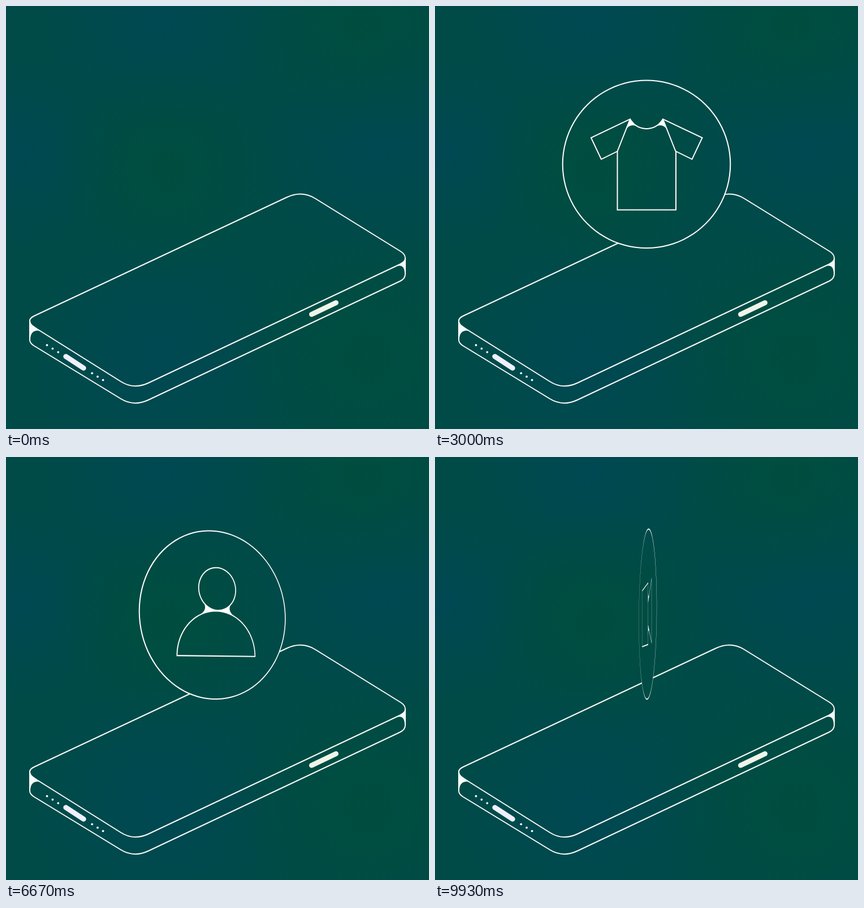
An HTML page with a canvas that plays this animation: 748 by 748 pixels, repeating every 9.99 s.

```html
<!DOCTYPE html>
<html lang="en">
<head>
<meta charset="utf-8">
<title>Phone with turning icons</title>
<style>
  html, body { margin: 0; width: 100%; height: 100%; overflow: hidden; background: #004b48; }
  canvas { display: block; width: 748px; height: 748px; }
</style>
</head>
<body>
<canvas id="stage" width="748" height="748"></canvas>
<script>
const SIZE = 748, MID = SIZE / 2, CY = 279.8, ZOOM = 1039;
const LOOP = 9990, STEP = 1000 / 15, TURN = 30;
const { PI, sin, cos, hypot, floor, SQRT1_2 } = Math;

const stage = document.getElementById('stage').getContext('2d');

function layer() {
  const c = document.createElement('canvas');
  c.width = c.height = SIZE;
  return c.getContext('2d');
}

// ---- background -------------------------------------------------
function paintBackground(g) {
  g.fillStyle = '#004b48';
  g.fillRect(0, 0, SIZE, SIZE);
  const glow = (rgb, x, y, r) => {
    const grad = g.createRadialGradient(x, y, 0, x, y, r);
    grad.addColorStop(0, `rgba(${rgb},.9)`);
    grad.addColorStop(.5, `rgba(${rgb},.45)`);
    grad.addColorStop(1, `rgba(${rgb},0)`);
    g.fillStyle = grad;
    g.fillRect(0, 0, SIZE, SIZE);
  };
  const blue = '0,72,84', green = '0,78,62';
  glow(blue, 270, 20, 210);
  glow(blue, 660, 240, 210);
  glow(blue, 270, 620, 230);
  glow(blue, 20, 260, 170);
  glow(green, 285, 290, 200);
  glow(green, 630, 40, 210);
  glow(green, 640, 620, 240);
}

// ---- phone ------------------------------------------------------
function paintPhone(g) {
  const white = '#f8fbf8';
  g.strokeStyle = g.fillStyle = white;
  g.lineWidth = 2;
  g.stroke(new Path2D('M51 547.5L496 338.5Q523 325.7 547 340.5L698 434Q706 439 706 446' +
    'Q706 452 697 456.5L252 666.5Q226 678.7 203 664L50 568Q42 563 42 556.5Q42 551.5 51 547.5Z'));
  g.stroke(new Path2D('M42 556V590Q42 596 49 600.5L203 694.5Q226 708.7 252 696.5' +
    'L697 486.5Q706 482 706 474V446'));
  g.fill(new Path2D('M42 561L61 574.5C50 572 43 577 43 590H41Z'));
  g.fill(new Path2D('M706 450L690 460C700 457.5 705 461 705 474H707Z'));

  g.lineCap = 'round';
  g.lineWidth = 9;
  g.strokeStyle = '#f0f0ff';
  g.stroke(new Path2D('M105.8 619.8L137.2 640.2'));
  g.strokeStyle = '#f0f5ea';
  g.stroke(new Path2D('M540.5 545.3L583.5 524.7'));

  for (const x of [72.5, 82.4, 92.3, 152.2, 162, 171.6]) {
    g.beginPath();
    g.arc(x, 599.7 + (x - 72.5) * .623, 1.9, 0, 2 * PI);
    g.fill();
  }
}

// ---- geometry helpers -------------------------------------------
function arc(cx, cy, r, from, to, n = 40) {
  return Array.from({ length: n + 1 }, (_, i) => {
    const a = from + (to - from) * i / n;
    return [cx + r * cos(a), cy + r * sin(a)];
  });
}
const circle = (cx, cy, r) => arc(cx, cy, r, 0, 2 * PI, 96).slice(0, -1);

function quad(a, b, c, n = 10) {
  return Array.from({ length: n + 1 }, (_, i) => {
    const t = i / n, s = 1 - t;
    return [0, 1].map(j => s * s * a[j] + 2 * s * t * b[j] + t * t * c[j]);
  });
}
const flipX = pts => pts.map(([x, y]) => [SIZE - x, y]);
const flipY = pts => pts.map(([x, y]) => [x, 2 * 279.5 - y]);

// One side of a mitred stroke around a polyline
function offset(pts, d, closed) {
  const n = pts.length;
  const normal = (a, b) => {
    const dx = b[0] - a[0], dy = b[1] - a[1], l = hypot(dx, dy) || 1;
    return [-dy / l, dx / l];
  };
  return pts.map((p, i) => {
    const prev = closed || i ? pts[(i + n - 1) % n] : null;
    const next = closed || i < n - 1 ? pts[(i + 1) % n] : null;
    const a = normal(prev || p, prev ? p : next);
    const b = next ? normal(p, next) : a;
    const k = d / Math.max(.15, 1 + a[0] * b[0] + a[1] * b[1]);
    return [p[0] + (a[0] + b[0]) * k, p[1] + (a[1] + b[1]) * k];
  });
}

// Shapes are lists of closed loops, filled even-odd
const fill = pts => [pts];
const outline = pts => [offset(pts, 1, true), offset(pts, -1, true)];
const line = (...pts) => [[...offset(pts, 1, false), ...offset(pts, -1, false).reverse()]];

// ---- icons ------------------------------------------------------
function music() {
  const note = x => {
    const stem = x + 27.4;
    return [
      outline(circle(x, 325, 27.4)),
      line([stem, 205], [stem, 325]),
      fill([[stem + 1, 292], [stem + 1, 325], ...arc(x, 325, 27.4, 0, -1.1, 12),
        ...quad([x + 12.4, 300.6], [x + 25, 304], [stem - 1, 292])])
    ];
  };
  return [...note(313.4), ...note(413.4), line([340.8, 206], [440.8, 206])];
}

function shirt() {
  const gusset = [[345, 199], [336.5, 221], ...quad([337.5, 220], [343, 207], [358, 213]),
    [352, 208]];
  const seam = [[345, 200], [322.5, 257]];
  return [
    outline([[276, 233], [294, 271], [322.5, 257], [322.5, 360.5], [426, 360.5], [426, 257],
      [454.5, 271], [472.5, 233], ...arc(374, 183.8, 33.2, .509, PI - .509)]),
    line(...seam), line(...flipX(seam)),
    fill(gusset), fill(flipX(gusset))
  ];
}

function ticket() {
  const tilt = pts => pts.map(([a, b]) =>
    [MID + (a + b) * SQRT1_2, 279.5 + (b - a) * SQRT1_2]);
  const flare = s => tilt([[-39, 54 * s],
    ...quad([-39, 53 * s], [-26, 52 * s], [-26, 38 * s]),
    ...quad([-24, 38 * s], [-24, 52 * s], [-11, 53 * s]), [-11, 54 * s]]);
  return [
    outline(tilt([[88, -54], ...arc(88, 0, 21, -PI / 2, -1.5 * PI), [88, 54],
      [-88, 54], ...arc(-88, 0, 21, PI / 2, -PI / 2), [-88, -54]])),
    line(...tilt([[-25, -54], [-25, 54]])),
    fill(flare(1)), fill(flare(-1))
  ];
}

function person() {
  const side = quad([344.5, 257], [355, 269], [341, 279]);
  return [
    outline(circle(MID, 233.5, 37.7)),
    outline(arc(MID, 352, 79.5, -PI, 0, 64)),
    fill([...side, ...arc(MID, 352, 79.5, -1.99, -1.15, 16),
      ...flipX(side).reverse(), ...arc(MID, 233.5, 37.7, .67, PI - .67, 20)])
  ];
}

function video() {
  const web = [[400.5, 243], [400.5, 259.3], [422, 246.4],
    ...quad([422, 246.4], [404, 256], [401.5, 243])];
  return [
    outline([[294.5, 226.5], [400.5, 226.5], [400.5, 332.5], [294.5, 332.5]]),
    line([400.5, 259.3], [453.8, 227], [453.8, 332], [400.5, 299.7]),
    fill(web), fill(flipY(web))
  ];
}

// ---- drawing ----------------------------------------------------
const icons = [music, shirt, ticket, person, video].map(make => make());
const disc = circle(MID, CY, 148.3);
const rim = outline(disc);

const back = layer();
paintBackground(back);
const scene = layer();
scene.drawImage(back.canvas, 0, 0);
paintPhone(scene);
const backFill = stage.createPattern(back.canvas, 'no-repeat');

function paint(loops, angle, style) {
  const c = cos(angle), s = sin(angle);
  stage.beginPath();
  for (const pts of loops) {
    pts.forEach(([x, y], i) => {
      const u = x - MID, k = ZOOM / (ZOOM - u * s);
      stage[i ? 'lineTo' : 'moveTo'](MID + u * c * k, MID + (y - MID) * k);
    });
    stage.closePath();
  }
  stage.fillStyle = style;
  stage.fill('evenodd');
}

function draw(ms) {
  const tick = Math.min(149, floor((ms + 3.4) / STEP));
  const turn = tick % TURN;
  stage.drawImage(scene.canvas, 0, 0);
  if (!turn) return;   // edge-on
  const angle = (turn / TURN - .5) * PI;
  paint([disc], angle, backFill);
  paint(rim, angle, '#fff');
  for (const shape of icons[floor(tick / TURN)]) paint(shape, angle, '#fff');
}

const start = performance.now();
function frame() {
  draw((performance.now() - start) % LOOP);
  requestAnimationFrame(frame);
}
frame();
</script>
</body>
</html>
```
